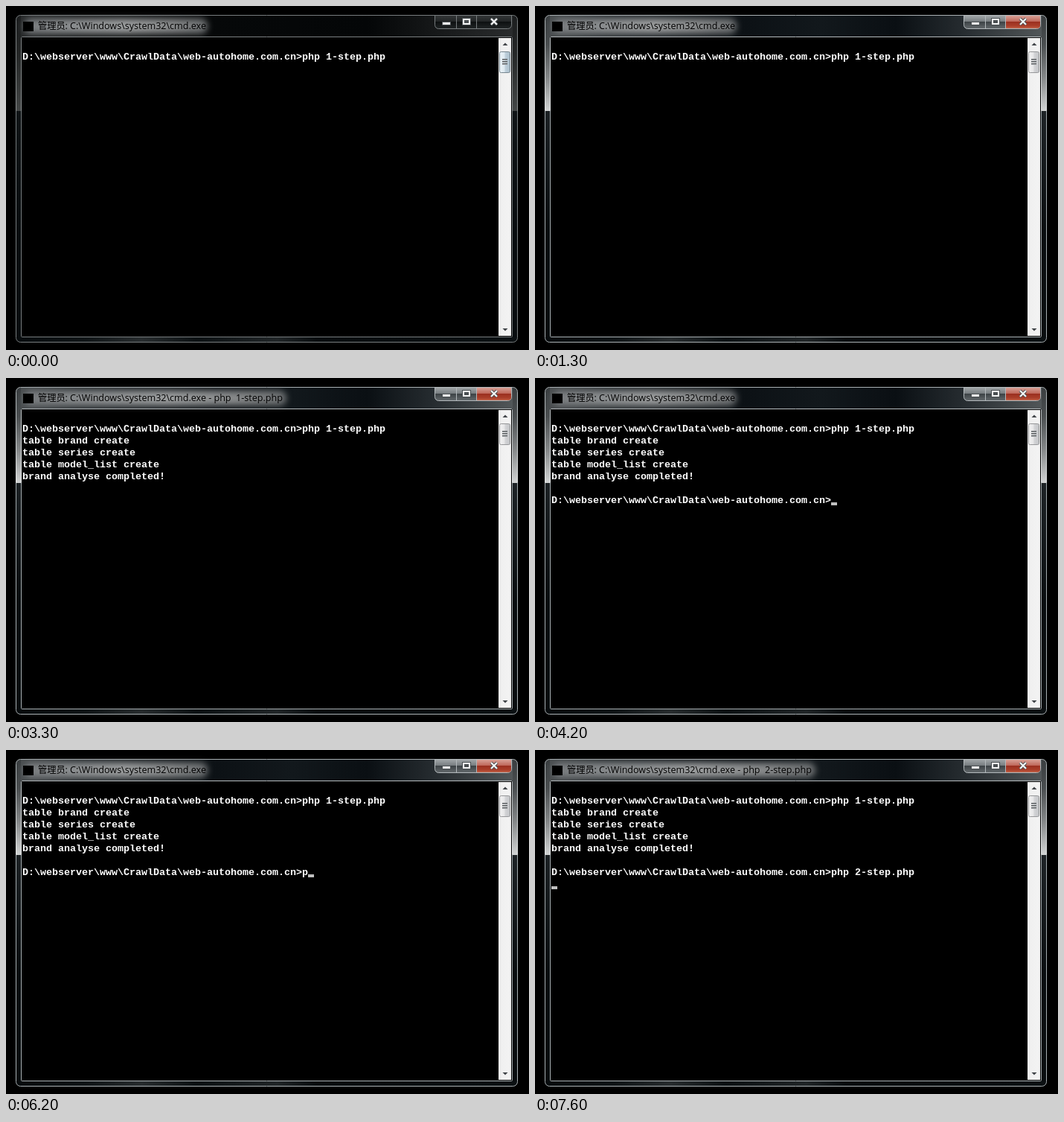
Recreate the animation shown at these times as an HTML page with a canvas. Size 703 by 462 pixels, loop 8 s.

```html
<!DOCTYPE html>
<html lang="en">
<head>
<meta charset="utf-8">
<title>Command window</title>
<style>
  html, body { margin: 0; width: 100%; height: 100%; overflow: hidden; background: #000; }
  canvas { display: block; }
</style>
</head>
<body>
<canvas id="stage" width="703" height="462"></canvas>
<script>
const ctx = document.getElementById('stage').getContext('2d');
const LOOP = 8000;
const PROMPT = 'D:\\webserver\\www\\CrawlData\\web-autohome.com.cn>';
const OUTPUT = ['table brand create', 'table series create', 'table model_list create', 'brand analyse completed!'];
const MONO = 'bold 13.333px "Liberation Mono", monospace';
const UI = '12.55px "Open Sans", "Noto Sans", sans-serif';
const CJK = '12.3px "Noto Sans CJK SC", "Noto Sans CJK", sans-serif';

// Each step changes part of the state; cursor is [column, row].
const STEPS = [
  [0, { active: false, printed: 0, typed: null, running: '', cursor: null }],
  [300, { active: true }],
  [800, { cursor: [61, 0] }],
  [1300, { cursor: null }],
  [1700, { cursor: [0, 1] }],
  [1800, { running: ' - php  1-step.php' }],
  [2000, { printed: 2, cursor: null }],
  [2100, { printed: 3 }],
  [2800, { cursor: [0, 4] }],
  [3200, { printed: 4, cursor: [0, 5] }],
  [3300, { cursor: null }],
  [3400, { typed: '', running: '' }],
  [4200, { cursor: [47, 6] }],
  [4700, { cursor: null }],
  [5200, { cursor: [47, 6] }],
  [5700, { typed: 'p', cursor: null }],
  [6200, { cursor: [48, 6] }],
  [6300, { typed: 'ph', cursor: null }],
  [6500, { typed: 'php' }],
  [6600, { cursor: [50, 6] }],
  [6700, { typed: 'php ', cursor: null }],
  [7000, { typed: 'php 2' }],
  [7100, { cursor: [52, 6] }],
  [7300, { typed: 'php 2-step.php', cursor: null }],
  [7500, { cursor: [0, 7] }],
  [7600, { running: ' - php  2-step.php' }],
];

const stateAt = t => Object.assign({}, ...STEPS.filter(([start]) => start <= t).map(([, change]) => change));

function gradient(x0, y0, x1, y1, stops) {
  const g = ctx.createLinearGradient(x0, y0, x1, y1);
  stops.forEach(([at, color]) => g.addColorStop(at, color));
  return g;
}

function rect(x, y, w, h, fill) {
  ctx.fillStyle = fill;
  ctx.fillRect(x, y, w, h);
}

function rounded(x, y, w, h, radii, fill, stroke) {
  ctx.beginPath();
  ctx.roundRect(x, y, w, h, radii);
  if (fill) { ctx.fillStyle = fill; ctx.fill(); }
  if (stroke) { ctx.strokeStyle = stroke; ctx.stroke(); }
}

function text(str, x, y, font, color) {
  ctx.font = font;
  ctx.fillStyle = color;
  ctx.fillText(str, x, y);
}

function drawFrame(active) {
  const edge = gradient(0, 12, 0, 452, active
    ? [[0, '#a9b0b3'], [.29, '#e4e6e6'], [.295, '#a3abae'], [1, '#a9b0b3']]
    : [[0, '#777c7e'], [.29, '#8d9192'], [.295, '#747a7c'], [1, '#777c7e']]);
  ctx.save();
  rounded(14, 13, 673, 438, 5, '#06090b');
  ctx.clip();
  rect(14, 13, 673, 28, gradient(14, 0, 687, 0, active
    ? [[0, '#4c5052'], [.12, '#2b3033'], [.4, '#0c1115'], [.55, '#12181c'], [.7, '#0a0f13'], [.83, '#252b2f'], [1, '#54595b']]
    : [[0, '#292b2c'], [.12, '#181a1b'], [.4, '#060809'], [.7, '#040607'], [.83, '#151718'], [1, '#2b2d2e']]));
  const sheen = active
    ? [[0, '#3a3e40'], [.3, '#4b4f51'], [.65, '#858889'], [1, '#d2d4d4']]
    : [[0, '#1c1e1f'], [.4, '#252727'], [1, '#444747']];
  for (const x of [14, 681]) {
    rect(x, 13, 6, 128, gradient(0, 13, 0, 141, sheen));
    rect(x, 141, 6, 304, gradient(0, 141, 0, 300, [[0, active ? '#1d2225' : '#101416'], [1, '#090d0f']]));
  }
  rect(14, 445, 673, 6, gradient(14, 0, 687, 0,
    [[0, '#080c0e'], [.14, '#101517'], [.25, '#282d2f'], [.36, '#0c1113'], [.52, '#212628'], [.6, '#090d0f'], [1, '#0c1113']]));
  ctx.restore();
  rounded(13.5, 12.5, 674, 439, 6, null, edge);
  rounded(20.5, 41.5, 660, 403, 1, '#000', edge);
}

function drawTitle(running) {
  const right = running ? 377 : 271;
  ctx.save();
  ctx.filter = 'blur(4px)';
  rounded(24, 17, right - 24, 20, 9, gradient(20, 0, right, 0,
    [[0, '#74777a'], [.2, '#85888a'], [.55, '#9b9d9e'], [.8, '#868889'], [1, '#6b6e70']]));
  ctx.restore();
  rect(23, 21, 14, 13, '#000');
  text('管理员', 43, 31, CJK, '#000');
  text(':', 79.5, 31, UI, '#000');
  text('C:\\Windows\\system32\\cmd.exe' + running, 86, 31, UI, '#000');
}

function drawCaptionButtons(active) {
  const edge = active ? '#b2b8bb' : '#767b7d';
  const glass = active
    ? [[0, '#a6abad'], [.45, '#787e81'], [.5, '#3d4346'], [1, '#666c6f']]
    : [[0, '#353839'], [.45, '#232627'], [.5, '#0d1011'], [1, '#222627']];
  const red = [[0, '#dba89e'], [.45, '#c0695c'], [.5, '#9b3020'], [.8, '#ac402b'], [1, '#ca7357']];
  const shade = stops => gradient(0, 12, 0, 31, stops);
  rounded(576.5, 12.5, 103, 18, [0, 0, 5, 5], shade(glass), edge);
  if (active) rounded(633, 13, 46, 17, [0, 0, 4, 0], shade(red));
  rect(605, 13, 1, 17, edge);
  rect(632, 13, 1, 17, edge);

  const glyph = '#f4f5f5', outline = '#4a4f52';
  rect(586, 21, 12, 5, outline);
  rect(587, 22, 10, 3, glyph);
  rect(613, 16, 12, 10, outline);
  rect(614, 17, 10, 8, glyph);
  rect(616, 19, 6, 4, outline);
  for (const [width, color] of [[4, outline], [2.2, glyph]]) {
    ctx.lineWidth = width;
    ctx.strokeStyle = color;
    ctx.beginPath();
    ctx.moveTo(652, 17); ctx.lineTo(660, 25);
    ctx.moveTo(660, 17); ctx.lineTo(652, 25);
    ctx.stroke();
  }
  ctx.lineWidth = 1;
}

function arrow(y, direction) {
  ctx.fillStyle = '#404448';
  ctx.beginPath();
  ctx.moveTo(667.5, y);
  ctx.lineTo(674.5, y);
  ctx.lineTo(671, y + 3.5 * direction);
  ctx.fill();
}

function drawScrollbar(active) {
  rect(662, 43, 17, 400, gradient(662, 0, 679, 0, [[0, '#e6e6e6'], [.2, '#f0f0f0'], [1, '#f3f3f3']]));
  arrow(53, -1);
  arrow(433, 1);
  const face = active
    ? [[0, '#f5f5f5'], [.48, '#e5e5e6'], [.52, '#d3d4d6'], [1, '#c2c4c7']]
    : [[0, '#eef5f9'], [.48, '#dce8ef'], [.52, '#c0d1dc'], [1, '#a9bdca']];
  rounded(663.5, 61.5, 14, 28, 2, gradient(663, 0, 678, 0, face), active ? '#969799' : '#77868f');
  for (const y of [71, 74, 77]) {
    rect(667, y, 7, 1, '#55595c');
    rect(667, y + 1, 7, 1, '#a3a6a8');
  }
}

function drawConsole({ printed, typed, cursor }) {
  const lines = [PROMPT + 'php 1-step.php', ...OUTPUT.slice(0, printed)];
  if (typed !== null) lines.push('', PROMPT + typed);
  lines.forEach((line, row) => text(line, 22, 72 + 16 * row, MONO, '#fff'));
  if (cursor) rect(22 + 8 * cursor[0], 71 + 16 * cursor[1], 8, 4, '#c0c0c0');
}

function render(now) {
  const state = stateAt(now % LOOP);
  rect(0, 0, 703, 462, '#000');
  drawFrame(state.active);
  drawTitle(state.running);
  drawCaptionButtons(state.active);
  drawScrollbar(state.active);
  drawConsole(state);
  requestAnimationFrame(render);
}
render(performance.now());
</script>
</body>
</html>
```
